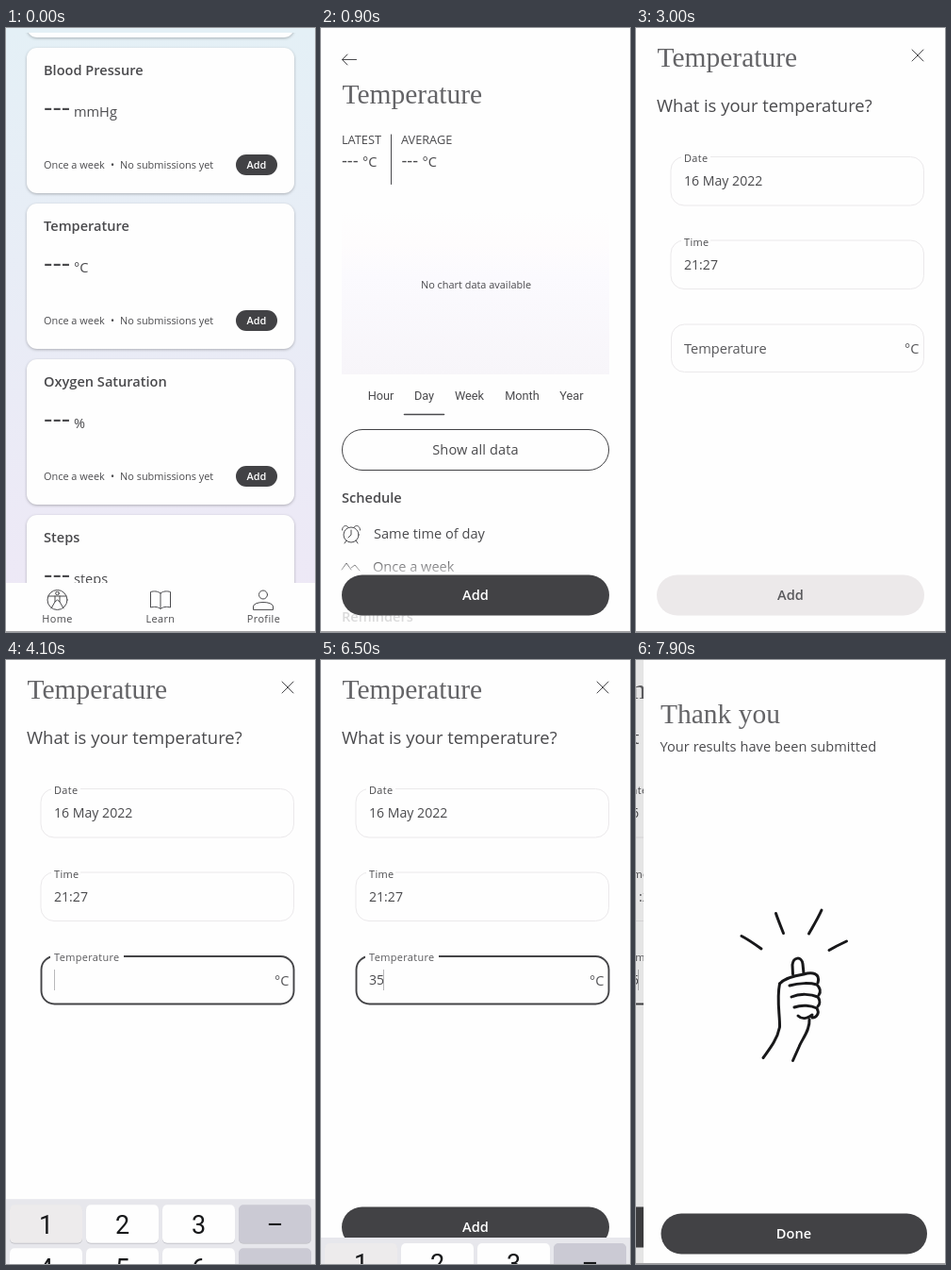
Write an HTML page that moves like this. It is 328 px wide and 640 px high and loops after 8000 ms.

```html
<!DOCTYPE html>
<html lang="en">
<head>
<meta charset="utf-8">
<title>Temperature entry</title>
<style>
  html, body { margin: 0; height: 100%; overflow: hidden; background: #fefefe; }
  svg { display: block; width: 100%; height: 100%; }
  text { font: 14.58px "Open Sans", "Noto Sans", sans-serif; fill: #4a4a4d; white-space: pre; }
  .title { font: 29.5px "Liberation Serif", "Times New Roman", serif; fill: #646467; }
  .semi { font-weight: 600; }
  .small { font-size: 10.93px; }
  .caption { font-size: 10.93px; letter-spacing: .36px; }
  .caps { font-size: 12.76px; }
  .value { font-size: 14.1px; }
  .question { font-size: 18.45px; }
  .dash { font-size: 29.2px; }
  .dash-small { font-size: 18.2px; }
  .tab { font: 12.76px Roboto, sans-serif; }
  .key { font: 27px Roboto, sans-serif; fill: #17181a; }
  .mid { text-anchor: middle; }
  .light { fill: #fff; }
  .soft { fill: #58585b; }
  .line { fill: none; stroke: #4a4a4d; stroke-linecap: round; stroke-linejoin: round; }
  .card { fill: #fefefe; filter: drop-shadow(0 1px 1.5px #0004); }
  .field { fill: none; stroke: #ebe9eb; }
  .ink { fill: none; stroke: #18181a; stroke-width: 3; stroke-linecap: round; stroke-linejoin: round; }
</style>
</head>
<body>
<svg id="stage" viewBox="0 0 328 640" preserveAspectRatio="none">
  <defs>
    <linearGradient id="sky" x2="0" y2="1">
      <stop stop-color="#e4f0f6"/><stop offset=".5" stop-color="#e9ecf6"/><stop offset="1" stop-color="#eee8f6"/>
    </linearGradient>
    <linearGradient id="chart" x2="0" y2="1">
      <stop stop-color="#fefefe"/><stop offset=".2" stop-color="#fefcfd"/>
      <stop offset=".4" stop-color="#fbfafe"/><stop offset="1" stop-color="#f7f5f9"/>
    </linearGradient>
    <linearGradient id="fade" x2="0" y2="1">
      <stop stop-color="#fefefe" stop-opacity="0"/><stop offset=".24" stop-color="#fefefe" stop-opacity=".8"/>
      <stop offset="1" stop-color="#fefefe" stop-opacity=".8"/>
    </linearGradient>
    <clipPath id="pill"><rect x="22" y="579.5" width="284" height="43" rx="21.5"/></clipPath>
  </defs>
</svg>
<script>
const WIDTH = 328, LOOP = 8000, STEP = 100, KEYBOARD = 191, DARK = '#424245';
const stage = document.getElementById('stage');

const text = (x, y, content, cls = '', extra = '') =>
  `<text x="${x}" y="${y}" class="${cls}" ${extra}>${content}</text>`;
const rect = (x, y, w, h, rx, extra = '') =>
  `<rect x="${x}" y="${y}" width="${w}" height="${h}" rx="${rx}" ${extra}/>`;
const line = (d, width = 1) => `<path class="line" d="${d}" stroke-width="${width}"/>`;
const ink = d => `<path class="ink" d="${d}"/>`;
const page = (id, content, fill = '#fefefe') =>
  `<g id="${id}">${rect(0, 0, WIDTH, 640, 0, `fill="${fill}"`)}${content}
   ${rect(0, 0, WIDTH, 640, 0, `id="${id}Shade" opacity="0"`)}</g>`;
const addButton = name =>
  `${rect(22, 579.5, 284, 43, 21.5, `id="${name}Button" fill="${DARK}"`)}
   <circle id="${name}Ripple" cx="136" cy="601" fill="#fff" clip-path="url(#pill)"/>
   ${text(164, 606, 'Add', 'semi mid light', `id="${name}Add"`)}`;

function card(y, name, unit) {
  return rect(22, y, 284, 154, 11, 'class="card"') +
    text(40, y + 29, name, 'semi') +
    text(40, y + 73, '---', 'dash') + text(72, y + 73, unit) +
    text(40, y + 128, 'Once a week', 'small') + text(113, y + 128, '•', 'small mid') +
    text(121, y + 128, 'No submissions yet', 'small') +
    rect(244, y + 113, 44, 22, 11, `fill="${DARK}"`) +
    text(266, y + 128, 'Add', 'semi small mid light');
}

const home = page('home',
  card(-144, '', '') + rect(0, 0, WIDTH, 5, 0, 'fill="#e4f0f6"') +
  card(21, 'Blood Pressure', 'mmHg') + card(186, 'Temperature', '°C') +
  card(351, 'Oxygen Saturation', '%') + card(516, 'Steps', 'steps') +
  rect(0, 588, WIDTH, 52, 0, 'fill="#fefefe"') +
  '<circle class="line" cx="54.5" cy="606" r="10.5"/><circle class="line" cx="54.5" cy="599" r="1.8"/>' +
  line('M45 602H64M52 602V608L48 615M57 602V608L61 615M52 608L54.5 606L57 608') +
  line('M164 599C161 596.5 157 596.5 153.5 597.5V614C157 613 161 613 164 615.5C167 613 171 613 174.5 614V597.5C171 596.5 167 596.5 164 599V615') +
  '<circle class="line" cx="273" cy="600.5" r="4.5"/>' +
  line('M262.5 616V613C262.5 607 283.5 607 283.5 613V616Z') +
  text(54.5, 630, 'Home', 'caption mid') + text(164, 630, 'Learn', 'caption mid') +
  text(273.5, 630, 'Profile', 'caption mid'), 'url(#sky)');

const periods = [['Hour', 63.5], ['Day', 109.5], ['Week', 157.5], ['Month', 213.5], ['Year', 266]];
const detail = page('detail',
  line('M37.5 33.5H22.5M28 28L22.5 33.5L28 39') +
  text(22.5, 79.5, 'Temperature', 'title') +
  text(22, 123, 'LATEST', 'caps') + text(85, 123, 'AVERAGE', 'caps') +
  text(22, 147, '---', 'dash-small') + text(44, 147, '°C') +
  text(85.5, 147, '---', 'dash-small') + text(107.5, 147, '°C') +
  line('M74.5 113V165.5') +
  rect(22, 195, 284, 172, 0, 'fill="url(#chart)"') +
  text(164.5, 276, 'No chart data available', 'small mid') +
  periods.map(([name, x]) => text(x, 394, name, 'tab mid')).join('') +
  line('M88.5 409.5H130.5', 1.6) +
  rect(22.5, 425.5, 283, 43, 21.5, `fill="none" stroke="${DARK}"`) +
  text(164, 452, 'Show all data', 'mid', 'letter-spacing=".1"') +
  text(22, 503, 'Schedule', 'semi') +
  '<circle class="line" cx="32" cy="537" r="8"/>' +
  line('M32 532V537L29 540M22.5 532C22.5 528 26 526 28.5 528.5M41.5 532C41.5 528 38 526 35.5 528.5M27 543L25 546M37 543L39 546') +
  text(56, 541, 'Same time of day') +
  line('M22 574L27 567L32 574M32 572L36 569L41 575') +
  text(55, 576, 'Once a week') + text(22, 629, 'Reminders', 'semi') +
  rect(0, 562, WIDTH, 78, 0, 'fill="url(#fade)"') + addButton('detail'));

function field(y, label, value) {
  return rect(37, y, 268.5, 51.5, 14, 'class="field"') +
    rect(48, y - 2, 31, 5, 0, 'fill="#fefefe"') +
    text(51, y + 5.5, label, 'caption') + text(51, y + 30.5, value, 'value');
}

const form = page('form',
  text(22.5, 40.5, 'Temperature', 'title') + line('M293 23L305 35M305 23L293 35') +
  text(22, 88.5, 'What is your temperature?', 'question') +
  field(136.5, 'Date', '16 May 2022') + field(225, 'Time', '21:27') +
  rect(37.5, 314, 268, 50.5, 14, 'id="box" class="field"') +
  rect(47, 311, 78, 6, 0, 'id="notch" fill="#fefefe"') +
  text(51, 345, 'Temperature', 'soft', 'id="label"') + text(285, 345, '°C', 'soft') +
  text(51, 344, '', 'value', 'id="reading"') +
  rect(0, 328, 1, 22, 0, 'id="cursor" fill="#b8b8ba"') + addButton('form'));

const thanks = page('thanks', `<g transform="translate(-8)">` +
  text(26, 67, 'Thank you', 'title') +
  text(25.5, 97, 'Your results have been submitted', '', 'letter-spacing=".05"') +
  ink('M112 292.5C119 296 126 301 133 306M148.5 268.5C151 276 154 283 156.5 289.5M197 265C193 274 188 282 183.5 290M223.5 298C217 301 211 304 205 307.5') +
  ink('M166.5 333L166 323C167 314 176 314 177 322L178 332') +
  ink('M152.5 343C157 338 165 335 178 333C187 330 196 332 193 342') +
  ink('M163 345C173 342 185 342 192 344C196 348 196 352 194 355') +
  ink('M165 357C174 353 186 354 193 357C196 361 195 365 193 367') +
  ink('M168 368C176 365 186 366 192 369C195 374 192 379 187 379M172 377C176 381 182 380 187 376') +
  ink('M152.5 343C149 360 153 377 152.5 389C150 402 142 412 135 421.5M184 381C185 392 176 402 173 410L166.5 424.5') +
  rect(26.5, 586.5, 282.5, 43, 21.5, `fill="${DARK}"`) +
  text(167.5, 613, 'Done', 'semi mid light') + '</g>');

const keyLabels = ['1', '2', '3', '–', '4', '5', '6', '', '7', '8', '9', '', ',', '0', '.', ''];
const keys = keyLabels.map((label, i) => {
  const column = i % 4, row = Math.floor(i / 4), x = 4 + column * 81, y = 455 + row * 46;
  const fill = i === 15 ? '#2374e1' : column === 3 ? '#cbcad4' : i === 0 ? '#edebec' : '#fefefe';
  return rect(x, y + 1, 77, 40.5, 5, 'fill="#c5c5cb"') +
    rect(x, y, 77, 40.5, 5, `id="key${i}" fill="${fill}"`) +
    text(x + 38.5, y + 31, label, 'key mid');
}).join('');
const keyboard = `<g id="keyboard">${rect(0, 449, WIDTH, KEYBOARD, 0, 'fill="#e7e7ec"')}${keys}
  ${line('M276.5 519V524H294.5V519', 1.7)}
  ${line('M281 560H295.5V576H281L274.5 568ZM284 565L290.5 571.5M290.5 565L284 571.5', 1.6)}
  <path d="M278 614L283 619L293 608" fill="none" stroke="#fff" stroke-width="2"/></g>`;

stage.insertAdjacentHTML('beforeend', home + detail + form + thanks +
  rect(0, 639, WIDTH, 1, 0, 'fill="#a0a0a2"') + keyboard);

const el = id => document.getElementById(id);
const set = (id, attributes) => {
  for (const name in attributes) el(id).setAttribute(name, attributes[name]);
};
const clamp = v => Math.min(1, Math.max(0, v));

// Pages push in from the right while the one below drifts left and dims.
function push(below, above, t, start) {
  const offset = Math.round(WIDTH * (1 - clamp((t - start) / 500)) ** 3);
  const progress = 1 - offset / WIDTH;
  set(above, { transform: `translate(${offset})` });
  if (progress > 0) set(below, { transform: `translate(${-.2 * WIDTH * progress})` });
  set(below + 'Shade', { opacity: .1 * progress });
}

function ripple(name, t, start) {
  const age = t - start;
  set(name + 'Ripple', { r: age < 0 ? 0 : 89 + age * .6, opacity: .2 * (1 - clamp(age / 500)) });
}

function render(t) {
  set('home', { transform: '' });
  push('home', 'detail', t, 450);
  push('detail', 'form', t, 2550);
  push('form', 'thanks', t, 7545);
  ripple('detail', t, 2500);
  ripple('form', t, 7200);

  const focused = t >= 4000, typed = t >= 5400 ? '35' : t >= 5300 ? '3' : '';
  const float = clamp((t - 3900) / 200);
  set('box', { style: focused ? 'stroke:#444447;stroke-width:1.9' : '' });
  set('notch', { opacity: focused ? 1 : 0 });
  set('label', { y: 345 - 26 * float, style: `font-size:${14.58 - 3.65 * float}px;letter-spacing:${.36 * float}px` });
  el('reading').textContent = typed;

  const typing = t >= 5300 && t < 5500;
  const cursorOn = focused && (typing || Math.floor(t / 500) % 2 === 0 !== t >= 5000);
  set('cursor', { x: 51 + typed.length * 7.5, opacity: cursorOn ? 1 : 0 });

  set('formButton', { fill: typed ? DARK : '#ece9ea' });
  set('formAdd', { style: typed ? '' : 'fill:#5a5a5d' });
  set('key2', { fill: t === 5300 ? '#dddce0' : '#fefefe' });
  set('key5', { fill: t === 5400 ? '#dddce0' : '#fefefe' });

  const hidden = t < 6200
    ? (1 - clamp((t - 4000) / 500)) ** 2
    : (1 - Math.cos(Math.PI * clamp((t - 6200) / 400))) / 2;
  set('keyboard', { transform: `translate(0 ${KEYBOARD * hidden})` });
}

function tick() {
  render(Math.floor(performance.now() % LOOP / STEP) * STEP);
  requestAnimationFrame(tick);
}
tick();
</script>
</body>
</html>
```
